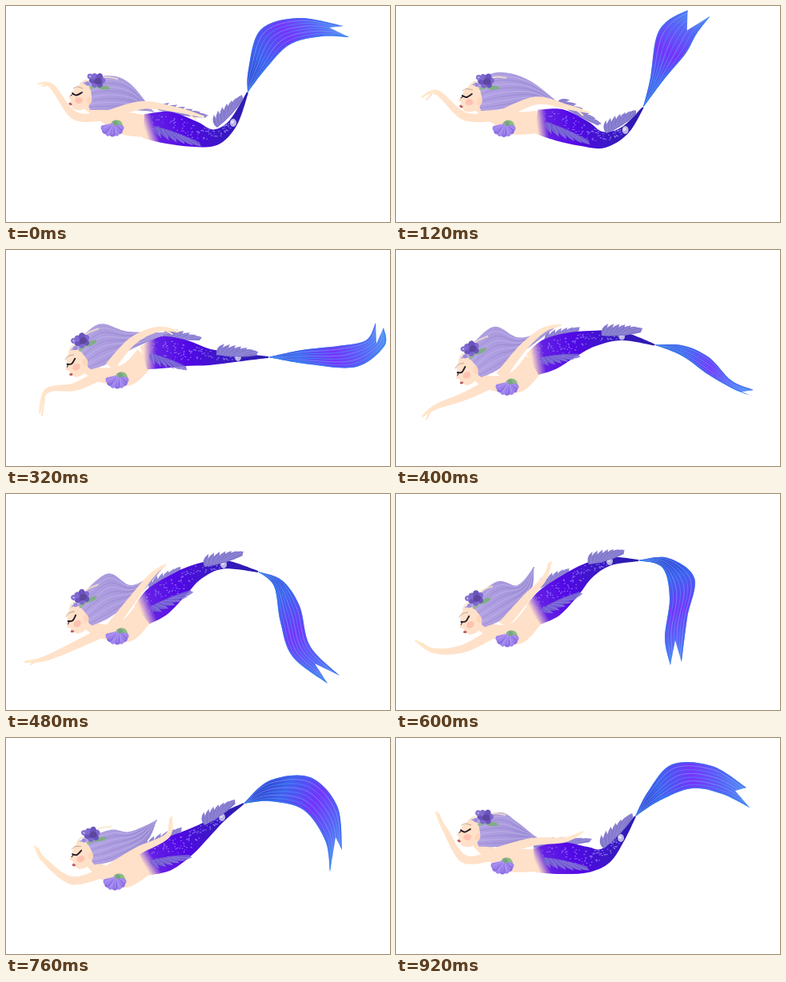
Recreate the animation shown at these times as an HTML page with a canvas. Size 480x270 px, loop 0.96 s.

```html
<!DOCTYPE html>
<html lang="en">
<head>
<meta charset="utf-8">
<title>Swimming mermaid</title>
<style>
html, body { margin: 0; width: 100%; height: 100%; overflow: hidden; background: #fff; }
canvas { display: block; }
</style>
</head>
<body>
<canvas id="stage" width="480" height="270"></canvas>
<script>
const ctx = document.getElementById('stage').getContext('2d');
const LOOP = 960, STEP = 40;
const SKIN = '#ffe0c8', TAU = Math.PI * 2;

// Key poses; each row below belongs to one of these times.
const times = [0, 200, 320, 480, 600, 760, 920];

// Eye position and head turn in degrees.
const head = [[90,110,0], [90,116,-10], [83,140,-31], [84,156,-33], [88,157,-31], [90,144,-18], [88,116,-1]];

const shell = [[133,153], [137,154], [139,163], [139,178], [139,181], [136,180], [133,160]];

// Shoulder, elbow, wrist, fingertip.
const frontArm = [
  [124,137, 86,137, 57,100, 40,97],
  [122,139, 85,139, 50,120, 30,131],
  [118,156, 86,171, 51,176, 42,204],
  [122,172, 85,190, 48,206, 23,210],
  [124,172, 85,193, 48,196, 24,183],
  [122,168, 82,178, 48,153, 36,135],
  [122,147, 85,151, 61,114, 50,92]];

const backArm = [
  [125,138, 170,124, 215,130, 248,139],
  [130,138, 178,116, 213,121, 236,126],
  [130,146, 158,114, 190,99, 216,102],
  [132,166, 158,132, 182,102, 200,88],
  [134,164, 164,129, 185,106, 194,84],
  [130,164, 165,141, 202,122, 207,98],
  [127,143, 170,130, 212,127, 234,117]];

// Upper edge, tip, lower edge.
const hair = [
  [128,87, 155,97, 184,132, 160,130, 130,130],
  [125,82, 170,92, 220,122, 180,117, 140,128],
  [115,93, 153,102, 205,103, 155,125, 125,143],
  [125,100, 158,114, 197,91, 165,128, 130,154],
  [125,110, 152,114, 172,92, 168,122, 135,155],
  [130,115, 155,117, 188,103, 175,130, 135,153],
  [130,93, 150,104, 175,124, 155,132, 130,136]];

const spine = [
  [172,150, 202,152, 235,160, 262,164, 284,146, 302,108],
  [177,141, 205,144, 235,159, 258,168, 288,157, 314,133],
  [172,135, 195,128, 225,129, 255,134, 290,134, 328,134],
  [170,151, 190,134, 215,114, 240,97, 272,88, 315,97],
  [172,151, 192,136, 218,114, 240,96, 267,84, 303,83],
  [172,158, 198,147, 225,132, 248,116, 270,99, 297,82],
  [173,153, 205,150, 240,152, 262,147, 281,125, 299,98]];

// Upper edge, tip, notch, tip, lower edge back to the ankle.
const fluke = [
  [303,80, 318,30, 365,15, 422,25, 404,27, 429,39, 395,38, 355,48, 325,78],
  [335,98, 336,55, 333,25, 345,1, 352,36, 381,7, 370,35, 373,75, 350,105],
  [370,125, 415,120, 450,113, 462,91, 463,117, 472,97, 473,120, 438,146, 380,143],
  [345,108, 367,140, 380,190, 417,227, 386,212, 402,237, 358,203, 343,160, 335,115],
  [340,80, 373,105, 364,155, 357,210, 349,183, 343,214, 336,180, 342,130, 333,92],
  [330,53, 380,49, 414,85, 420,140, 412,124, 405,167, 399,128, 372,90, 330,79],
  [315,67, 345,33, 395,35, 438,62, 424,66, 442,87, 408,70, 370,63, 330,78]];

// Start and end of the back, hip and ankle fins.
const fins = [
  [190,130, 250,140, 186,150, 243,171, 264,152, 297,116],
  [204,116, 254,152, 188,139, 240,165, 262,161, 305,140],
  [196,108, 243,113, 180,129, 226,146, 263,131, 313,132],
  [180,120, 219,95, 180,141, 231,120, 248,91, 296,77],
  [180,118, 217,97, 182,143, 230,122, 241,88, 285,75],
  [172,141, 220,116, 180,153, 230,146, 248,109, 287,82],
  [172,137, 243,130, 184,149, 240,161, 260,138, 297,99]];

// Periodic monotone cubic interpolation of a pose table.
function pose(rows, t) {
  const n = times.length;
  let i = n - 1;
  while (times[i] > t) i--;
  const time = k => times[(k + n) % n] + LOOP * Math.floor(k / n);
  const span = time(i + 1) - time(i), u = (t - time(i)) / span;
  return rows[0].map((_, c) => {
    const value = k => rows[(k + n) % n][c];
    const slope = k => (value(k + 1) - value(k)) / (time(k + 1) - time(k));
    const tangent = k => {
      const a = slope(k - 1), b = slope(k);
      return a * b > 0 ? 2 * a * b / (a + b) : 0;
    };
    const p = value(i), d = value(i + 1) - p;
    const m0 = tangent(i) * span, m1 = tangent(i + 1) * span;
    return p + u * (m0 + u * (3 * d - 2 * m0 - m1 + u * (m0 + m1 - 2 * d)));
  });
}

const points = (rows, t) => {
  const flat = pose(rows, t);
  return flat.filter((_, i) => i % 2 === 0).map((x, i) => [x, flat[2 * i + 1]]);
};
const mix = (a, b, k) => [a[0] + (b[0] - a[0]) * k, a[1] + (b[1] - a[1]) * k];

// Smooth open curve through points, continuing the path unless fresh.
function curve(pts, fresh = true) {
  if (fresh) ctx.moveTo(...pts[0]);
  else ctx.lineTo(...pts[0]);
  for (let i = 0; i < pts.length - 1; i++) {
    const a = pts[i], b = pts[i + 1], before = pts[i - 1] || a, after = pts[i + 2] || b;
    ctx.bezierCurveTo(
      a[0] + (b[0] - before[0]) / 6, a[1] + (b[1] - before[1]) / 6,
      b[0] - (after[0] - a[0]) / 6, b[1] - (after[1] - a[1]) / 6, b[0], b[1]);
  }
}

function fill(style, build) {
  ctx.beginPath();
  build();
  ctx.closePath();
  ctx.fillStyle = style;
  ctx.fill();
}

function line(pts, color, width) {
  ctx.beginPath();
  curve(pts);
  ctx.strokeStyle = color;
  ctx.lineWidth = width;
  ctx.stroke();
}

function oval(x, y, rx, ry, color, turn = 0) {
  fill(color, () => ctx.ellipse(x, y, rx, ry, turn, 0, TAU));
}

function shade(a, b, stops) {
  const g = ctx.createLinearGradient(...a, ...b);
  stops.forEach(([at, color]) => g.addColorStop(at, color));
  return g;
}

function normal(pts, i) {
  const a = pts[Math.max(i - 1, 0)], b = pts[Math.min(i + 1, pts.length - 1)];
  const len = Math.hypot(b[0] - a[0], b[1] - a[1]) || 1;
  return [(b[1] - a[1]) / len, (a[0] - b[0]) / len];
}

function limb(pts, widths, style) {
  const side = s => pts.map((p, i) => {
    const n = normal(pts, i);
    return [p[0] + n[0] * widths[i] * s, p[1] + n[1] * widths[i] * s];
  });
  fill(style, () => {
    curve(side(1));
    curve(side(-1).reverse(), false);
  });
}

function drawArm(pts) {
  limb(pts, [6.5, 5, 3.2, 1.2], shade(pts[0], pts[3], [[0, SKIN], [.7, '#ffe2ca'], [1, '#ffe9c8']]));
  const thumb = mix(pts[2], pts[3], .35);
  line([thumb, [thumb[0] + (pts[3][0] - thumb[0]) * .5, pts[3][1] + 3]], '#ffe2ca', 2);
}

function drawFin([a, b], height, count, color) {
  const n = normal([a, b], 0);
  const at = (k, h) => {
    const p = mix(a, b, k);
    return [p[0] + n[0] * h, p[1] + n[1] * h];
  };
  const tip = k => at(k + .1, height * (1 - .75 * k * k));
  fill(color, () => {
    ctx.moveTo(...a);
    for (let i = 0; i < count; i++) {
      const k = (i + .6) / count;
      ctx.quadraticCurveTo(...at(k - .12, height * .7), ...tip(k));
      ctx.lineTo(...at(k + .05, height * .45 * (1 - k)));
    }
    ctx.lineTo(...b);
    ctx.quadraticCurveTo(...at(.5, -height * .3), ...a);
  });
  for (let i = 0; i < count; i++) {
    const k = (i + .6) / count;
    line([at(k * .6, 0), tip(k)], 'rgba(178,166,236,.6)', .7);
  }
}

function drawFluke(base, p) {
  const upper = [base, ...p.slice(0, 4)], lower = [...p.slice(5), base];
  const outline = () => {
    curve(upper);
    ctx.quadraticCurveTo(...mix(p[3], p[4], .6), ...p[4]);
    ctx.lineTo(...p[5]);
    curve(lower, false);
  };
  const color = shade(base, mix(p[3], p[5], .5),
    [[0, '#2b36c4'], [.25, '#3f62ee'], [.55, '#7534fb'], [.8, '#5a62f6'], [1, '#5590f2']]);
  fill(color, outline);
  ctx.save();
  ctx.beginPath();
  outline();
  ctx.clip();
  const back = [...lower].reverse();
  for (let k = 1; k < 7; k++) {
    const rib = upper.map((u, i) => mix(u, back[i], k / 7));
    line(rib, k % 2 ? 'rgba(130,165,255,.6)' : 'rgba(70,190,250,.4)', 1);
  }
  line(upper, 'rgba(60,110,240,.7)', 3);
  line(lower, 'rgba(50,130,240,.7)', 3);
  ctx.restore();
}

function drawTail(s) {
  const widths = [15, 20, 16, 10, 5.5, 1];
  limb(s, widths, shade(s[0], s[5],
    [[0, SKIN], [.1, '#6420e4'], [.35, '#5208e6'], [.65, '#3b18c4'], [1, '#2a1cae']]));
  let seed = 7;
  const random = () => (seed = seed * 16807 % 2147483647) / 2147483647;
  for (let i = 0; i < 110; i++) {
    const u = .35 + random() * 3.6, k = Math.floor(u), n = normal(s, k);
    const p = mix(s[k], s[k + 1], u - k);
    const off = (random() * 1.3 - .5) * (widths[k] + (widths[k + 1] - widths[k]) * (u - k));
    oval(p[0] + n[0] * off, p[1] + n[1] * off, .5 + random() * .8, .7, 'rgba(158,142,255,.75)');
  }
  oval(...s[4], 4, 5, '#b9b5e2');
  oval(s[4][0] - 1, s[4][1] - 1, 2, 2, '#e0def4');
}

function drawHair(p, root, nape) {
  const upper = [root, ...p.slice(0, 3)], lower = [...p.slice(2), nape];
  fill(shade(root, p[2], [[0, '#b5a5e4'], [.6, '#a898dc'], [1, '#9488d2']]), () => {
    curve(upper);
    curve(lower, false);
  });
  const back = [...lower].reverse();
  for (let k = 1; k < 9; k++) {
    line(upper.map((u, i) => mix(u, back[i], k / 9)), k % 2 ? '#c2b4ee' : '#9888d2', .8);
  }
}

function drawFace() {
  fill(SKIN, () => {
    curve([[5,-14], [-4,-7], [-8,0], [-12,4], [-9,8], [-11,12], [-8,15], [-5,19], [4,20], [13,15], [17,5], [15,-9]]);
  });
  oval(1, 8, 5, 4, 'rgba(255,150,140,.4)');
  oval(14, 8, 3.2, 4.5, '#ffd6ba', .3);
  line([[-7,-1], [-2,1.5], [5,-2]], '#241a26', 1.9);
  line([[-6,0], [-9,2]], '#241a26', 1);
  line([[-6,-7], [-1,-9], [6,-7]], '#b79a86', .8);
  oval(-9.5, 12.5, 2.2, 1.5, '#b95c63', .5);
}

function drawFlower() {
  line([[3,-13], [10,-17], [18,-14]], '#f3e6d2', 2);
  line([[23,-13], [34,-21], [49,-19]], 'rgba(246,229,196,.8)', 2);
  oval(32, -8, 8, 2.5, '#7fae82', .1);
  oval(20, -9, 6, 2.2, '#8fb890', -.3);
  for (let i = 0; i < 6; i++) {
    const a = i * TAU / 6;
    oval(24 + 5.5 * Math.cos(a), -17 + 5 * Math.sin(a), 4.8, 4, i % 2 ? '#6a54bd' : '#8068d0', a);
  }
  oval(25, -16, 5, 4, '#5c469f');
  oval(15, -22, 3.4, 3.4, '#8570d2');
  oval(15, -22, 1, 1, '#d5c9f4');
  oval(12, -13, 2.5, 2.5, '#9b8ada');
}

function drawShell([x, y]) {
  oval(x + 3, y - 7, 5, 3, '#79ad7c', -.5);
  oval(x + 9, y - 6, 5, 3, '#8dbb84', .9);
  const top = [x + 2, y - 7];
  for (let i = 0; i < 7; i++) {
    const a = Math.PI * (.02 + .16 * i);
    const end = [x + 11 * Math.cos(a), y + 1 + 8 * Math.sin(a) - 2];
    fill(i % 2 ? '#8c70e2' : '#a084ee', () => {
      ctx.moveTo(...top);
      ctx.arc(...end, 3.5, a - 1.6, a + 1.6);
    });
    line([top, end], '#bda8f6', .8);
  }
  oval(x + 4, y - 6, 3, 2.5, '#73a879');
}

function draw(t) {
  ctx.clearRect(0, 0, 480, 270);
  ctx.lineCap = 'round';
  const s = points(spine, t), f = points(fins, t);
  const front = points(frontArm, t), [cup] = points(shell, t);
  const [x, y, degrees] = pose(head, t), turn = degrees * Math.PI / 180;
  const onHead = (hx, hy) => [
    x + hx * Math.cos(turn) - hy * Math.sin(turn),
    y + hx * Math.sin(turn) + hy * Math.cos(turn)];

  drawArm(front);
  drawFin(f.slice(0, 2), 11, 6, '#8a7fd0');
  drawFluke(s[5], points(fluke, t));
  const waist = mix(s[0], s[1], .1);
  limb([onHead(9, 12), front[0], [cup[0] + 12, cup[1] - 7], waist], [6, 9, 14, 14], SKIN);
  drawTail(s);
  drawFin(f.slice(2, 4), -11, 6, 'rgba(118,104,208,.85)');
  drawFin(f.slice(4), 14, 7, '#8379cc');
  drawHair(points(hair, t), onHead(5, -14), onHead(15, 20));
  ctx.save();
  ctx.translate(x, y);
  ctx.rotate(turn);
  drawFace();
  drawFlower();
  ctx.restore();
  drawShell(cup);
  drawArm(points(backArm, t));
}

function tick() {
  draw(Math.floor(performance.now() % LOOP / STEP) * STEP);
  requestAnimationFrame(tick);
}
tick();
</script>
</body>
</html>
```
